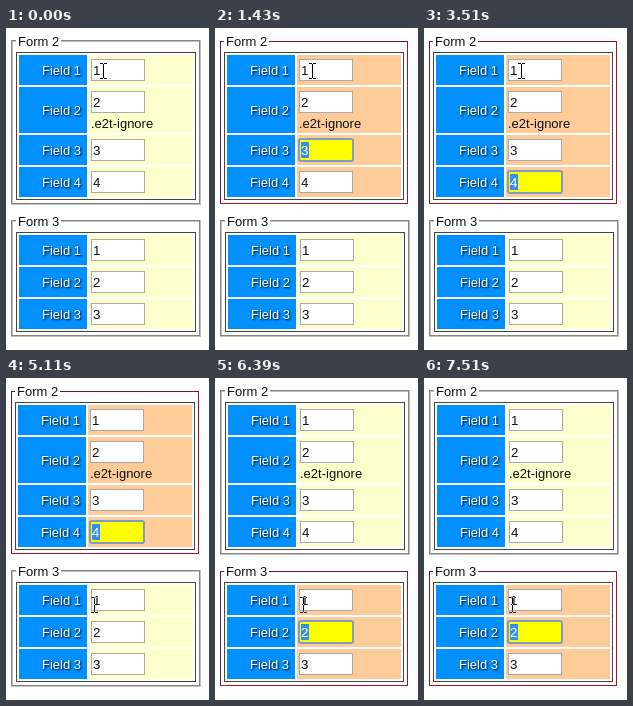
These frames come from a looping animation (203x322 px, 8000 ms). An HTML page with a canvas:

```html
<!DOCTYPE html>
<html lang="en">
<head>
<meta charset="utf-8">
<title>Form focus</title>
<style>
  html, body { margin: 0; width: 100%; height: 100%; overflow: hidden; background: #fff; }
  canvas { display: block; }
</style>
</head>
<body>
<canvas id="stage" width="203" height="322"></canvas>
<script>
const ctx = document.getElementById('stage').getContext('2d');
const LOOP = 8000;
const FONT = '"Liberation Sans", Arial, sans-serif';

const forms = [
  { title: 'Form 2', top: 0, rows: [30, 46, 30, 30], caretX: 9 },
  { title: 'Form 3', top: 180, rows: [30, 30, 30], caretX: 2 }
];

// [start time, form, field, caret visible]; the first field gets a caret, the others are selected
const focusSteps = [
  [0, -1], [470, 0, 0, true], [950, 0, 0], [1430, 0, 2], [1910, 0, 3],
  [2390, 0, 0, true], [2550, 0, 0], [2870, 0, 2], [3510, 0, 3],
  [5430, 1, 0, true], [5910, 1, 0], [6390, 1, 1], [6710, 1, 2],
  [7190, 1, 0, true], [7510, 1, 1]
];

// [start time, x, y]
const pointerSteps = [
  [0, 94, 35], [4630, 93, 37], [4790, 88, 106], [4950, 85, 210], [5110, 85, 219]
];

const stepAt = (steps, t) => steps.filter(step => step[0] <= t).pop();

function rect(x, y, w, h, color) {
  ctx.fillStyle = color;
  ctx.fillRect(x, y, w, h);
}

// One-pixel frame; the second color paints the right and bottom sides
function frame(x, y, w, h, topLeft, bottomRight = topLeft) {
  rect(x, y + h - 1, w, 1, bottomRight);
  rect(x + w - 1, y, 1, h, bottomRight);
  rect(x, y, w - 1, 1, topLeft);
  rect(x, y, 1, h - 1, topLeft);
}

function text(str, x, baseline, color = '#111', size = 13) {
  ctx.font = `${size}px ${FONT}`;
  ctx.fillStyle = color;
  ctx.fillText(str, x, baseline);
}

function label(str, right, baseline) {
  ctx.save();
  ctx.textAlign = 'right';
  ctx.shadowColor = '#000';
  ctx.shadowOffsetX = ctx.shadowOffsetY = 1;
  ctx.shadowBlur = 2;
  text(str, right, baseline, '#fff');
  ctx.restore();
}

function drawInput(x, y, value, focus, form) {
  rect(x, y, 54, 22, focus ? '#ff0' : '#fff');
  frame(x, y, 54, 22, '#a9a9a9');
  let color = '#111';
  if (focus) {
    ctx.strokeStyle = '#7f9cc4';
    ctx.lineWidth = 2;
    ctx.beginPath();
    ctx.roundRect(x, y, 54, 22, 2);
    ctx.stroke();
    if (value > 1) {
      rect(x + 2, y + 3, 8, 16, '#3390ee');
      color = '#fff';
    }
  }
  text(value, x + 2, y + 16, color, 13.33);
  if (focus && focus[3]) rect(x + form.caretX, y + 3, 1, 16, '#000');
}

function drawForm(form, focus) {
  const border = focus ? 1 : 2;
  const left = 8 + border;
  const top = form.top + 24;
  const tableHeight = form.rows.reduce((sum, h) => sum + h + 2, 4);
  const borderTop = form.top + (focus ? 13 : 12);
  const width = 186 + 2 * border;
  const height = top + tableHeight + 3 + border - borderTop;

  if (focus) {
    frame(5, borderTop, width, height, '#6a1a22', '#a8122a');
  } else {
    frame(5, borderTop, width, height, '#868686', '#c0c0c0');
    frame(6, borderTop + 1, width - 2, height - 2, '#c0c0c0', '#868686');
  }
  rect(left, form.top + 6, 45, 15, '#fff');
  text(form.title, left + 2, form.top + 18);
  frame(left, top, 180, tableHeight, '#444');

  let y = top + 3;
  form.rows.forEach((h, i) => {
    rect(left + 3, y, 68, h, '#0090ff');
    rect(left + 73, y, 104, h, focus ? '#fc9' : '#ffc');
    label(`Field ${i + 1}`, left + 65, y + h / 2 + 5);
    drawInput(left + 75, y + 4, i + 1, focus && focus[2] === i && focus, form);
    if (h > 30) text('.e2t-ignore', left + 75, y + 41);
    y += h + 2;
  });
}

// Text pointer that inverts whatever lies beneath it
function drawPointer(x, y) {
  ctx.globalCompositeOperation = 'difference';
  for (const row of [y, y + 15]) {
    rect(x, row, 3, 1, '#fff');
    rect(x + 4, row, 3, 1, '#fff');
  }
  rect(x + 3, y + 1, 1, 14, '#fff');
  ctx.globalCompositeOperation = 'source-over';
}

function draw() {
  const t = performance.now() % LOOP;
  const focus = stepAt(focusSteps, t);
  rect(0, 0, 203, 322, '#fff');
  forms.forEach((form, i) => drawForm(form, focus[1] === i ? focus : null));
  const [, x, y] = stepAt(pointerSteps, t);
  drawPointer(x, y);
  requestAnimationFrame(draw);
}
draw();
</script>
</body>
</html>
```
